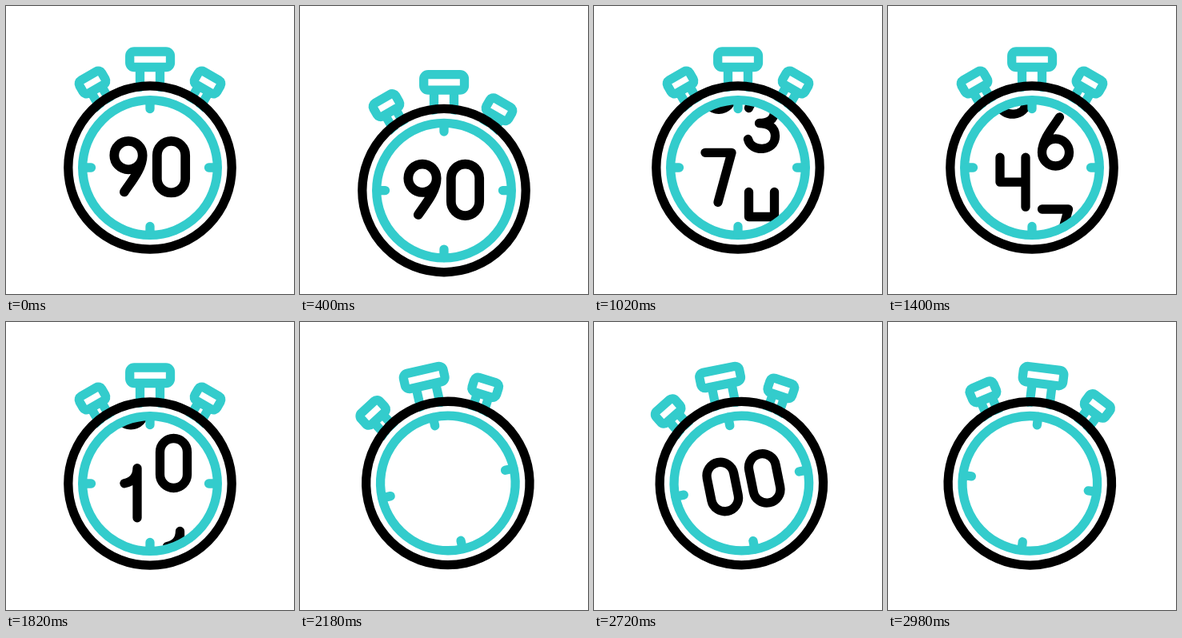
Animation of 360 by 360 pixels, one loop 3000 ms. Source, as an HTML page:

```html
<!DOCTYPE html>
<html lang="en">
<head>
<meta charset="utf-8">
<title>Countdown stopwatch</title>
<style>
  html, body { margin: 0; width: 100%; height: 100%; overflow: hidden; background: #fff; }
  svg { display: block; width: 100vw; height: 100vh; fill: none; stroke-width: 11.3; stroke-linecap: round; stroke-linejoin: round; }
  .teal { stroke: #33cccc; }
  .black { stroke: #000; }
</style>
</head>
<body>
<svg viewBox="0 0 360 360">
  <defs>
    <clipPath id="face"><circle cx="180" cy="202" r="84"/></clipPath>
    <g id="sideButton">
      <path d="M-7.5 14V34M7.5 14V34"/>
      <rect x="-16" y="-9.5" width="32" height="19" rx="5" fill="#fff"/>
    </g>
  </defs>
  <g id="watch">
    <g class="teal">
      <path d="M167.5 78V102M192.5 78V102"/>
      <rect x="154.7" y="57" width="50.8" height="19.5" rx="5.5"/>
      <use href="#sideButton" transform="translate(108 95.5) rotate(-30)"/>
      <use href="#sideButton" id="pusher"/>
    </g>
    <circle cx="180" cy="202" r="96" fill="#fff"/>
    <g id="digits" class="black" clip-path="url(#face)">
      <g id="tens"></g>
      <g id="units"></g>
    </g>
    <g class="teal">
      <circle cx="180" cy="202" r="84.3"/>
      <path d="M180 118V128.5M180 286V275.5M96 202H106.5M264 202H253.5"/>
    </g>
    <circle class="black" cx="180" cy="202" r="102.2"/>
  </g>
</svg>
<script>
const LOOP = 3000, PITCH = 116, SWING = 1000 / 12, SHAKE_START = 2119;
const GLYPHS = [
  "M-17-14a17 17 0 0 1 34 0V14a17 17 0 0 1-34 0Z",
  "M-8-12C2-14 8-20 8-31V31",
  "M-17-14a17 17 0 0 1 34 0C17 2-17 16-17 31H17",
  "M-16-20C-12-35 16-35 16-16C16-5 8-1-3-1C8-1 17 4 17 15C17 35-13 36-17 19",
  "M-16-31V0H16M16-31V31",
  "M15-31H-14L-16-4C-6-13 17-11 17 11C17 34-10 36-17 21",
  "M-17 14C-17-2-3-18 5-30M-17 14a17 17 0 0 1 34 0a17 17 0 0 1-34 0",
  "M-17-31H16L-1 31",
  "M0-1C-20-1-20-31 0-31S20-1 0-1C-23-1-23 31 0 31S23-1 0-1",
  "M17-14C17 2 3 18-5 30M17-14a17 17 0 0 1-34 0a17 17 0 0 1 34 0"
];

const $ = id => document.getElementById(id);
const progress = (t, from, to) => Math.min(1, Math.max(0, (t - from) / (to - from)));
const ease = u => (1 - Math.cos(Math.PI * u)) / 2;
const softEase = u => u - 0.0372 * Math.sin(2 * Math.PI * u);
const upDown = (t, start, peak, end) => ease(progress(t, start, peak)) - ease(progress(t, peak, end));

// The starting digit is slightly larger and further left than the rest.
function buildReel(id, top) {
  for (let n = 0; n <= top; n++) {
    const path = document.createElementNS("http://www.w3.org/2000/svg", "path");
    const place = n === top ? `translate(-3 ${n * PITCH - 0.5}) scale(1.04)` : `translate(0 ${n * PITCH})`;
    path.setAttribute("d", GLYPHS[n % 10]);
    path.setAttribute("transform", place);
    $(id).append(path);
  }
}

function setReel(id, x, value) {
  $(id).setAttribute("transform", `translate(${x} ${201.7 - value * PITCH})`);
}

function shakeAngle(t) {
  const swings = (t - SHAKE_START) / SWING;
  if (swings <= 0) return 0;
  return swings < 1 ? -15 * ease(swings) : 15 * Math.cos(Math.PI * swings);
}

function render(t) {
  const drop = 31.5 * upDown(t, 0, 327, 703);
  const press = 6.5 * upDown(t, 190, 365, 560);
  $("watch").setAttribute("transform", `translate(0 ${drop}) rotate(${shakeAngle(t)} 180 180)`);
  $("pusher").setAttribute("transform", `translate(252 95.5) rotate(30) translate(0 ${press})`);
  setReel("tens", 156, 9 * (1 - ease(progress(t, 478, 2166))));
  setReel("units", 209.5, 20 * (1 - softEase(progress(t, 569, 1839))));
  const blinkOff = t >= 2167 && Math.floor((t - 2167) * 6 / 1000) % 2 === 0;
  $("digits").style.display = blinkOff ? "none" : "";
}

buildReel("tens", 9);
buildReel("units", 20);
const start = performance.now();
function frame() {
  render((performance.now() - start) % LOOP);
  requestAnimationFrame(frame);
}
render(0);
requestAnimationFrame(frame);
</script>
</body>
</html>
```
